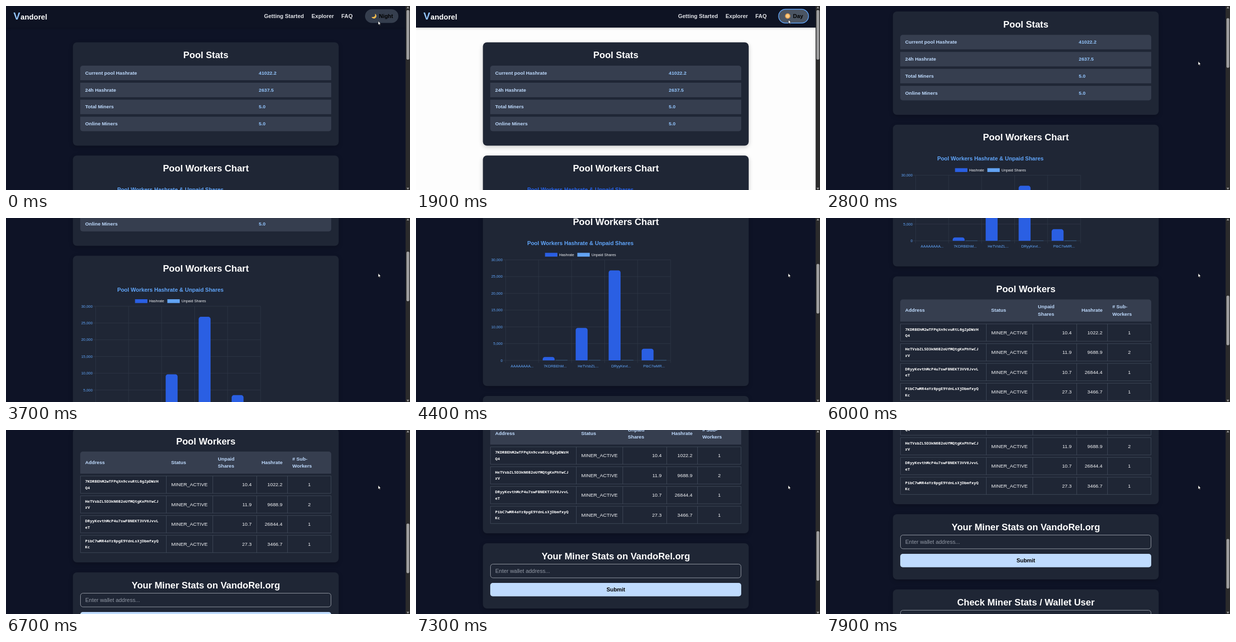
Recreate the animation shown at these times as an HTML page with a canvas. Size 800 by 367 pixels, loop 8 s.

```html
<!DOCTYPE html>
<html lang="en">
<head>
<meta charset="utf-8">
<title>Pool dashboard</title>
<style>
html, body { margin: 0; width: 100%; height: 100%; overflow: hidden; background: #0e1326; }
canvas { display: block; width: 800px; height: 367px; }
</style>
</head>
<body>
<canvas id="stage"></canvas>
<script>
const W = 800, H = 367, LOOP = 8000, STEP = 100;
const SANS = '"Liberation Sans", Arial, sans-serif';
const MONO = '"Noto Sans Mono", "DejaVu Sans Mono", monospace';
const CARD = '#1f2635', ROW = '#363e4f', LINE = '#465060';
const PALE = '#bfdbfe', SKY = '#93c5fd', BLUE = '#60a5fa', BAR = '#2a5fe3';
const LEFT = 147, RIGHT = 644, MID = 395.7;

const canvas = document.getElementById('stage');
const ctx = canvas.getContext('2d');
const dpr = window.devicePixelRatio || 1;
canvas.width = W * dpr;
canvas.height = H * dpr;

const scrollKeys = [[2450, 0], [2800, 61.5], [3700, 223], [5300, 434.5], [6700, 673.5], [7900, 789.5]];
const cursorKeys = [[0, 737, 30], [300, 737.5, 27.5], [2150, 737.5, 27.5], [2450, 737, 110.5]];

const stats = [
  ['Current pool Hashrate', '41022.2'],
  ['24h Hashrate', '2637.5'],
  ['Total Miners', '5.0'],
  ['Online Miners', '5.0']
];
const workers = [
  { addr: '7KDRBEhM2wTFPqXn9cvuRtL6gZpDWrHQ4', unpaid: 10.4, rate: 1022.2, subs: 1 },
  { addr: 'HeTVsbZL5D3kN6B2oUfMQtgKxPhYwCJrV', unpaid: 11.9, rate: 9688.9, subs: 2 },
  { addr: 'DRyyKevthMcP4u7swFBNEKT3VV6JvvLeT', unpaid: 10.7, rate: 26844.4, subs: 1 },
  { addr: 'PibC7wMR4aYr8pgE9YdnLsXjDbmfxyQKc', unpaid: 27.3, rate: 3466.7, subs: 1 }
];

const clamp = v => Math.max(0, Math.min(1, v));
const ease = v => { v = clamp(v); return v * v * (3 - 2 * v); };
const mix = (a, b, k) => a.map((v, i) => v + (b[i] - v) * k);
const rgb = c => `rgb(${c.map(Math.round).join(',')})`;

function track(keys, t) {
  if (t <= keys[0][0]) return keys[0].slice(1);
  for (let i = 1; i < keys.length; i++) {
    const a = keys[i - 1], b = keys[i];
    if (t <= b[0]) return mix(a.slice(1), b.slice(1), (t - a[0]) / (b[0] - a[0]));
  }
  return keys[keys.length - 1].slice(1);
}

// y is the middle of the capitals
function text(s, x, y, size, color, { weight = 'bold', align = 'left', font = SANS } = {}) {
  ctx.font = `${weight} ${size}px ${font}`;
  ctx.textAlign = align;
  ctx.fillStyle = color;
  ctx.fillText(s, x, y + size * 0.35);
}

function box(x, y, w, h, r, fill, stroke, lw = 1) {
  ctx.beginPath();
  ctx.roundRect(x, y, w, h, r);
  if (fill) { ctx.fillStyle = fill; ctx.fill(); }
  if (stroke) { ctx.strokeStyle = stroke; ctx.lineWidth = lw; ctx.stroke(); }
}

function line(x1, y1, x2, y2, color) {
  ctx.strokeStyle = color;
  ctx.lineWidth = 0.8;
  ctx.beginPath();
  ctx.moveTo(x1, y1);
  ctx.lineTo(x2, y2);
  ctx.stroke();
}

function polygon(points, fill, stroke) {
  ctx.beginPath();
  points.forEach(([x, y]) => ctx.lineTo(x, y));
  ctx.closePath();
  ctx.fillStyle = fill;
  ctx.fill();
  if (stroke) { ctx.strokeStyle = stroke; ctx.lineWidth = 0.6; ctx.stroke(); }
}

function disc(x, y, r, color) {
  ctx.beginPath();
  ctx.arc(x, y, r, 0, Math.PI * 2);
  ctx.fillStyle = color;
  ctx.fill();
}

function card(top, bottom, title) {
  ctx.save();
  ctx.shadowColor = 'rgba(0,0,0,0.2)';
  ctx.shadowBlur = 10 * dpr;
  ctx.shadowOffsetY = 3 * dpr;
  box(132.5, top, 526.3, bottom - top, 8, CARD);
  ctx.restore();
  text(title, MID, top + 25.3, 18.25, '#ffffff', { align: 'center' });
}

function moon(x, y) {
  ctx.beginPath();
  ctx.arc(x, y, 5, -1.15, 2.75);
  ctx.quadraticCurveTo(x + 4.6, y + 2.6, x + 2, y - 4.6);
  ctx.fillStyle = '#f5bd4f';
  ctx.fill();
}

function sun(x, y) {
  for (let i = 0; i < 12; i++) {
    const a = i * Math.PI / 6;
    disc(x + Math.cos(a) * 4.5, y + Math.sin(a) * 4.5, 1.1, '#e99a45');
  }
  disc(x, y, 4.4, '#f3b05d');
  disc(x, y, 3.2, '#f9cd86');
}

function header(day) {
  ctx.save();
  ctx.shadowColor = 'rgba(0,0,0,0.25)';
  ctx.shadowBlur = 5 * dpr;
  ctx.shadowOffsetY = dpr;
  ctx.fillStyle = '#0e1323';
  ctx.fillRect(0, 0, W, 43);
  ctx.restore();
  text('V', 14.8, 20, 20, SKY);
  text('andorel', 28.8, 21.5, 14.6, '#ffffff');
  const dx = day ? 8 : 0;
  text('Getting Started', 511 + dx, 20, 10.95, '#e1e3e8');
  text('Explorer', 605 + dx, 20, 10.95, '#e1e3e8');
  text('FAQ', 664 + dx, 20, 10.95, '#e1e3e8');
  if (day) {
    box(718, 6.5, 59.3, 27.5, 13.75, '#4b5563', BLUE, 1.4);
    sun(736, 20);
    text('Day', 746.5, 20, 10.95, '#000000');
  } else {
    box(711, 6.5, 66, 27.3, 13.65, '#353e4e');
    moon(728.5, 20);
    text('Night', 738.5, 20, 10.95, '#000000');
  }
}

function statsCard() {
  card(72.5, 278.5, 'Pool Stats');
  stats.forEach(([name, value], i) => {
    const y = 119 + i * 33.9;
    const r = i === 0 ? [5, 5, 0, 0] : i === 3 ? [0, 0, 5, 5] : 0;
    box(LEFT, y, RIGHT - LEFT, 29, r, ROW);
    text(name, 156.8, y + 14.2, 9.73, PALE);
    text(value, 500.5, y + 14.2, 9.73, SKY);
  });
}

function chartCard(fade) {
  const x0 = 177.6, cat = 65.3, zero = 599.5, unit = 33.42, small = 7.35;
  const grid = '#303948';
  const ink = { weight: 'normal' };
  card(298.2, 650.5, 'Pool Workers Chart');
  text('Pool Workers Hashrate & Unpaid Shares', 325.5, 366, 10.94,
    rgb(mix([96, 165, 250], [37, 99, 235], fade)), { align: 'center' });
  box(255.5, 385, 24.5, 7.6, 0, BAR);
  box(319.5, 385, 24.5, 7.6, 0, '#62a3f3');
  text('Hashrate', 283.4, 388.8, small, '#f0f2f5', ink);
  text('Unpaid Shares', 347.4, 388.8, small, '#f0f2f5', ink);

  for (let i = 0; i <= 6; i++) {
    const y = zero - i * unit;
    line(x0 - 5, y, x0 + cat * 5, y, grid);
    text((i * 5000).toLocaleString('en-US'), 171.5, y, small, BLUE, { weight: 'normal', align: 'right' });
  }
  for (let i = 0; i <= 5; i++) line(x0 + i * cat, zero - 6 * unit, x0 + i * cat, zero + 5, grid);

  ['AAAAAAAA', ...workers.map(w => w.addr.slice(0, 8))].forEach((name, i) => {
    const x = x0 + i * cat;
    text(name + '...', x + cat / 2, 610.6, small, BLUE, { weight: 'normal', align: 'center' });
    if (i === 0) return;
    const w = workers[i - 1];
    const h = w.rate / 5000 * unit;
    box(x + 8, zero - h, 23.6, h, [4.5, 4.5, 0, 0], BAR);
    box(x + 33.5, zero - 0.6, 23.6, 0.6 + w.unpaid / 5000 * unit, 0, '#41709f');
  });
}

function workersCard() {
  card(670.5, 937.5, 'Pool Workers');
  box(LEFT, 716.5, RIGHT - LEFT, 44, [5, 5, 0, 0], ROW);
  [['Address', 156.8, 738], ['Status', 327, 738], ['Unpaid', 419.5, 730.8], ['Shares', 419.5, 745.4],
   ['Hashrate', 506, 738], ['# Sub-', 567, 730.8], ['Workers', 567, 745.4]]
    .forEach(([s, x, y]) => text(s, x, y, 9.73, PALE));

  workers.forEach((w, i) => {
    const y = 765.2 + i * 39.45, mid = y + 17.2;
    const cell = (s, x, align) => text(s, x, mid, 9.73, '#f6f7f9', { weight: 'normal', align });
    box(LEFT + 0.4, y, RIGHT - LEFT - 0.8, 34.6, 0, null, LINE, 0.8);
    [317.5, 409.5, 496.5, 557.5].forEach(x => line(x, y, x, y + 34.6, LINE));
    text(w.addr.slice(0, 31), 156.8, mid - 6.2, 7.8, '#ffffff', { font: MONO });
    text(w.addr.slice(31), 156.8, mid + 6.2, 7.8, '#ffffff', { font: MONO });
    cell('MINER_ACTIVE', 327.3, 'left');
    cell(w.unpaid.toFixed(1), 486.3, 'right');
    cell(w.rate.toFixed(1), 547.3, 'right');
    cell(w.subs, 600.8, 'center');
  });
}

function field(y) {
  box(LEFT + 0.5, y, RIGHT - LEFT - 1, 27.4, 5, null, '#a3a9b3', 0.9);
  text('Enter wallet address...', 157, y + 14, 10.95, '#9299a5', { weight: 'normal' });
}

function formCards() {
  card(957.4, 1087.5, 'Your Miner Stats on VandoRel.org');
  field(999);
  box(LEFT, 1036.5, RIGHT - LEFT, 26.7, 5, PALE);
  text('Submit', MID, 1050, 10.95, '#000000', { align: 'center' });
  card(1107.5, 1237.5, 'Check Miner Stats / Wallet User');
  field(1149);
}

function scrollbar(y) {
  ctx.fillStyle = '#2b2b2c';
  ctx.fillRect(791.3, 0, 8.7, H);
  box(793, 8 + y * 0.265, 5.6, 99, 2.8, '#9e9e9f');
  polygon([[793.2, 4.8], [795.8, 1], [798.4, 4.8]], '#9e9e9f');
  polygon([[793.2, 362.6], [795.8, 366.4], [798.4, 362.6]], '#9e9e9f');
}

function cursor(x, y) {
  const shape = [[0, 0], [0, 7.6], [1.8, 6], [3, 8.6], [4.1, 8.1], [3, 5.6], [5.2, 5.4]];
  polygon(shape.map(p => [p[0] + x, p[1] + y]), '#ffffff', '#111111');
}

function draw(t) {
  const fade = ease((t - 200) / 500) - ease((t - 1950) / 350);
  const day = t >= 300 && t < 2000;
  const [y] = track(scrollKeys, t);
  ctx.setTransform(dpr, 0, 0, dpr, 0, 0);
  ctx.fillStyle = rgb(mix([14, 19, 38], [253, 253, 253], fade));
  ctx.fillRect(0, 0, W, H);
  ctx.save();
  ctx.translate(0, -y);
  header(day);
  statsCard();
  chartCard(fade);
  workersCard();
  formCards();
  ctx.restore();
  scrollbar(y);
  cursor(...track(cursorKeys, t));
}

const start = performance.now();
function tick() {
  const t = (performance.now() - start) % LOOP;
  draw(Math.floor(t / STEP) * STEP);
  requestAnimationFrame(tick);
}
tick();
</script>
</body>
</html>
```
